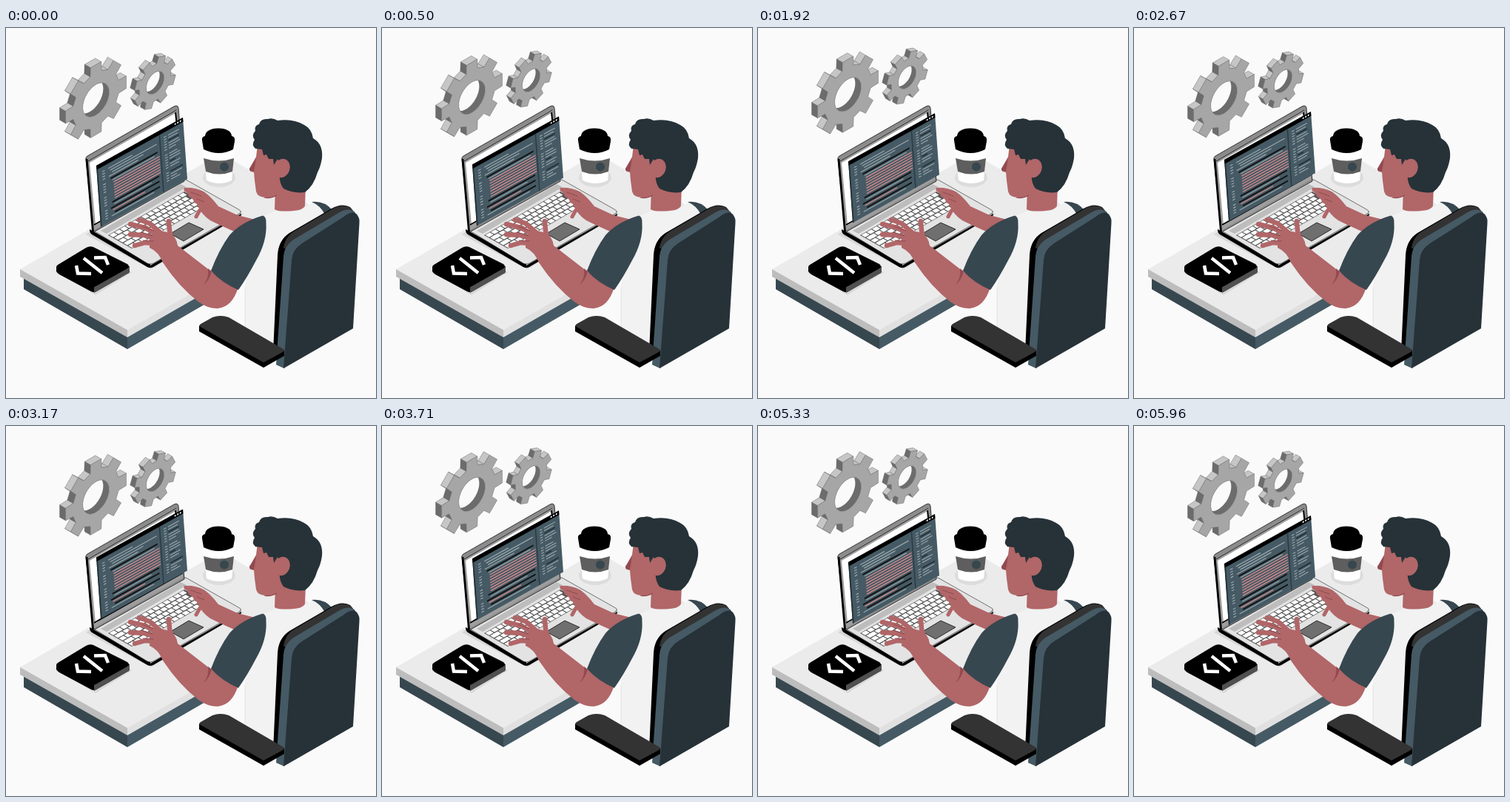
An HTML page for the animation above (6000 ms loop, 500 by 500 pixels).

```html
<!DOCTYPE html>
<html lang="en">
<head>
<meta charset="utf-8">
<title>Developer at a desk</title>
<style>
html, body { margin: 0; width: 100%; height: 100%; overflow: hidden; background: #fafafa; }
svg { display: block; width: 100vw; height: 100vh; }
.skin { fill: #b16668; }
.fingers { fill: none; stroke: #b16668; stroke-linecap: round; stroke-linejoin: round; }
.crease { fill: none; stroke: #924a50; stroke-width: 1; stroke-linecap: round; }
</style>
</head>
<body>
<svg viewBox="0 0 500 500">
  <g id="gears"></g>

  <!-- desk -->
  <path fill="#37474f" d="M24 338L164 417V434L24 353Z"/>
  <path fill="#455a64" d="M164 417L290 344V361L164 434Z"/>
  <path fill="#ebebeb" d="M19 326L290 169.500L440 256L164 408Z"/>
  <path fill="#bdbdbd" d="M19 326L164 408V418L19 336Z"/>
  <path fill="#e0e0e0" d="M164 408L300 331V340L164 418Z"/>

  <!-- notebook -->
  <path fill="#d8d8d8" d="M66 328L110 302L170 330L121 361Z"/>
  <path d="M68 323V329Q69 331 72 333L115 356Q119 358 122 356L164 332Q167 331 167 328V322Z"/>
  <path fill="#505050" d="M119 350L167 322V328Q167 331 164 332L119 358Z"/>
  <path d="M70 320L108 297Q113 294 118 296L164 319Q168 322 164 325L123 348Q119 351 114 348L70 326Q66 323 70 320Z"/>
  <g fill="none" stroke="#fff" stroke-width="4.5">
    <path d="M95 321L97 331.500L115 332"/><path d="M119 310.500L134 310L138 320"/>
    <path d="M105 311L130 331"/>
  </g>

  <!-- cup -->
  <ellipse cx="288" cy="202" rx="22" ry="13" fill="#dcdcdc"/>
  <path fill="#fff" d="M266 163L271 206Q288 214 305 206L309 163Z"/>
  <path fill="#5e5e5e" d="M267 176Q288 183 308 176L306 194Q288 201 270 194Z"/>
  <circle cx="295" cy="187.500" r="6" fill="#37474f"/>
  <path d="M265 152Q264 147 269 146Q270 136 287 135.500Q304 136 305 146Q310 147 309 153L307 164Q288 174 267 164Z"/>

  <!-- laptop -->
  <path fill="#d6d6d6" d="M108 279L122 268L322 251L196 326Z"/>
  <path d="M113 272L195 318L318 249V252Q318 254 315 255L199 323Q195 325 191 323L116 279Q113 277 113 272Z"/>
  <path fill="#bdbdbd" d="M195 317L318 247V251L195 321Z"/>
  <path fill="#e3e3e3" stroke="#222" stroke-width=".6" d="M117 273L239 205Q242 204 245 206L314 245Q320 248 315 251L199 318Q195 320 191 318Z"/>
  <path fill="#bdbdbd" d="M128 274L236 211L244 215L136 278Z"/>
  <g id="keys"></g>
  <path fill="#6f6f6f" stroke="#111" stroke-width=".8" d="M222 278L247 263L267 272L240 288Z"/>
  <path fill="#8b8b8b" stroke="#111" stroke-width=".8" d="M108 178Q107 175 110 173L227 106Q232 103.500 233 108L241 207L118 276Z"/>
  <path fill="#9e9e9e" d="M111 179L229 110L239 205L119 273Z"/>
  <path fill="#fff" d="M113 182L229 115L238 199L121 266Z"/>
  <path fill="none" stroke="#000" stroke-width="2" d="M229 114L238 199L119 266"/>
  <path fill="none" stroke="#000" stroke-width="2.800" d="M109 177L117.500 275"/>
  <path fill="none" stroke="#222" stroke-width="1" d="M111 180L230 111"/>

  <g id="win"></g>

  <!-- far arm -->
  <path class="skin" d="M240 216Q256 215 268 221.500Q278 229 287 241L313 253L345 261L330 284L306 274Q288 266 276 260Q264 252 258 238L243 221Z"/>
  <path class="fingers" stroke-width="5" d="M268 226L243 218.500M268 231L249 226M270 238L256 234M274 246L262 246L257 255"/>
  <path class="crease" d="M250 222L264 227M258 231L268 235"/>

  <!-- shirt and neck -->
  <path fill="#f2f2f2" d="M340 258L364 247L405 242L415 235Q427 239 434 249L400 290L372 440L323 410V345Z"/>
  <path fill="#37474f" d="M413 235Q430 233 441 246L431 252Q425 240 413 235Z"/>
  <path fill="none" stroke="#d8d8d8" stroke-width=".7" d="M323 350V410"/>
  <path fill="#b16668" d="M364 214H405L404 240Q402 247 382 247.500Q366 248 363 245Z"/>

  <!-- near arm -->
  <path class="skin" d="M194 283L204 273L218 276Q230 280 232 294L276 328L314 350Q306 377 286 379Q272 379 260 370Q234 350 212 317Q206 302 194 297Z"/>
  <path class="fingers" stroke-width="6.500" d="M208 276L194 264L180 259M205 280L188 270L168 265M203 285L187 280L168 279M202 291L188 290L174 294M224 286L221 274L220 261"/>
  <path class="crease" d="M184 268L199 274M183 276L198 281M185 287L199 288"/>
  <path fill="#924a50" d="M273 325Q275 337 267 347Q274 342 278 329Z"/>
  <path fill="#37474f" d="M347 253.500Q352 255 351.500 264Q353 288 338 314Q326 337 314 354Q291 344 277 328Q288 299 302 280Q318 262 347 253.500Z"/>

  <!-- head -->
  <path class="skin" d="M340 158L338 174L329 190Q328 194 335 195L336 206L338 221Q340 229 352 229Q363 231 370 222L395 212L392 155Z"/>
  <path fill="#924a50" d="M338 176L329 190Q328 194 335 194Z"/>
  <path fill="none" stroke="#924a50" stroke-width="1.200" d="M349 229Q357 231 366 226"/>
  <path fill="#263238" d="M337 163Q331 158 336 151Q331 145 337 139Q335 132 342 130Q344 122 354 123Q360 121 367 125Q388 122 403 131Q413 136 415 149Q429 157 427 176Q425 188 421 195Q416 213 404 222Q388 224 375 217Q367 207 371 187L367 177L362 185L361 177L355 177L352 171L348 172L346 164Z"/>
  <ellipse class="skin" cx="373" cy="189.500" rx="10.500" ry="13" transform="rotate(18 373 189.500)"/>

  <!-- chair -->
  <path d="M361 438L367 307Q368 287 383 277L440 244Q454 236 465 242L470 250L390 310L374 458Z"/>
  <path fill="#333" d="M375 297Q377 282 389 275L442 244Q455 237 466 243L470 248Q460 245 450 251L394 283Q383 290 380 300Z"/>
  <path fill="#455a64" d="M365 455L375 309Q376 294 390 285L451 249Q463 242 472 249L397 310L376 460Z"/>
  <path fill="#263238" d="M375 460L386 314Q387 299 400 291L455 256Q471 243 476 255Q478 258 477.500 264L469 406Z"/>
  <path d="M261 402L348 450L376 435V443L348 459L261 410Z"/>
  <path fill="#333" d="M263 400L279 391Q290 387 301 391L375 434Q377 436 374 438L348 452L263 404Q260 402 263 400Z"/>
</svg>
<script>
const NS = 'http://www.w3.org/2000/svg';
const $ = id => document.getElementById(id);

function add(parent, tag, attrs) {
  const el = document.createElementNS(NS, tag);
  for (const k in attrs) el.setAttribute(k, attrs[k]);
  parent.append(el);
  return el;
}

const rect = (g, x, y, width, height, fill) => add(g, 'rect', { x, y, width, height, fill });
const poly = pts => 'M' + pts.map(p => p.map(n => n.toFixed(2)).join(' ')).join('L') + 'Z';

// Extruded eight-tooth gear on an isometric wall
function gear(cx, cy, r, turn, depth) {
  const g = $('gears');
  const [dx, dy] = [-depth, -depth * 0.577];
  const at = (deg, rad) => {
    const a = deg * Math.PI / 180;
    const x = rad * Math.cos(a);
    return [cx + x * 0.866, cy + rad * Math.sin(a) - x * 0.5];
  };
  const circle = (rad, ox = 0, oy = 0) =>
    poly(Array.from({ length: 48 }, (_, i) => at(i * 7.5, rad)).map(([x, y]) => [x + ox, y + oy]));

  const rim = [];
  for (let i = 0; i < 8; i++) {
    const mid = i * 45 + turn;
    rim.push(at(mid - 14, r * 0.76), at(mid - 10, r), at(mid + 10, r), at(mid + 14, r * 0.76));
  }
  const sides = rim.map((p, i) => {
    const q = rim[(i + 1) % rim.length];
    const len = Math.hypot(q[0] - p[0], q[1] - p[1]);
    const nx = (q[1] - p[1]) / len, ny = (p[0] - q[0]) / len;
    return { p, q, ny, facing: nx * dx + ny * dy, order: (p[0] + q[0]) * dx + (p[1] + q[1]) * dy };
  }).filter(s => s.facing > 0).sort((a, b) => a.order - b.order);

  for (const { p, q, ny } of sides) {
    const back = [q, p].map(([x, y]) => [x + dx, y + dy]);
    add(g, 'path', { d: poly([p, q, ...back]), fill: ny < -0.4 ? '#c6c6c6' : '#6c6c6c', stroke: '#555', 'stroke-width': 0.4 });
  }
  const hole = circle(r * 0.43);
  const id = 'hole' + r;
  add(add(g, 'clipPath', { id }), 'path', { d: hole });
  add(g, 'path', { d: hole, fill: '#6c6c6c' });
  add(g, 'path', { d: circle(r * 0.43, dx, dy), fill: '#fafafa', 'clip-path': `url(#${id})` });
  add(g, 'path', { d: poly(rim) + hole, fill: '#a6a6a6', 'fill-rule': 'evenodd', stroke: '#666', 'stroke-width': 0.5 });
}

function keyboard() {
  const g = add($('keys'), 'g', { transform: 'matrix(1.03 -.59 .32 .18 138 280)' });
  rect(g, 0, 0, 100, 100, '#555');
  for (let row = 0; row < 5; row++) {
    const shift = row % 2 * 3;
    for (let x = 1; x < 98; x += 7) {
      const left = Math.max(1, x - shift);
      rect(g, left, row * 20 + 2, Math.min(5.9, 99 - left), 16, '#fff');
    }
  }
}

function codeWindow() {
  const g = add($('win'), 'g', { transform: 'matrix(1.17 -.65 .06 .83 122 186)' });
  let seed = 7;
  const rnd = () => (seed = seed * 16807 % 2147483647) / 2147483647;
  rect(g, 0, 0, 100, 100, '#455a64');
  rect(g, 0, 0, 100, 7, '#000');
  rect(g, 0, 7, 1.5, 93, '#263238');
  rect(g, 72, 7, 1.2, 93, '#2b3a42');
  for (const x of [91, 94, 97]) add(g, 'ellipse', { cx: x, cy: 3.5, rx: 0.9, ry: 1.3, fill: '#fff' });

  for (let i = 0; i < 19; i++) {
    const y = 14 + i * 4.3;
    if (i % 5 < 4) rect(g, 6, y, 3, 1.6, '#9aa7ad');
    const red = i > 5 && i < 13;
    const black = i === 4 || i === 13 || i === 15 || i === 17;
    const x = red ? 18 : 13 + (i % 3) * 2;
    const w = red ? 53 : black ? 56 - (i % 3) * 2 : 28 + rnd() * 28;
    rect(g, x, y, w, black ? 2.4 : 1.6, red || i === 16 ? '#e08c8e' : black ? '#111' : '#9aa7ad');
  }
  for (let i = 0; i < 18; i++) {
    if (i % 7 === 6) continue;
    const y = 14 + i * 4.2;
    rect(g, 77, y, 3, 1.5, '#9aa7ad');
    rect(g, 82, y, 6 + rnd() * 9, 1.5, i % 4 === 2 ? '#17232a' : '#9aa7ad');
  }
}

gear(121.5, 97, 48, 0, 8);
gear(201.5, 74, 32.5, 20, 6);
keyboard();
codeWindow();

const STEP = 1000 / 24;
// Rises from 0 to 1 and falls back at constant speed
const triangle = (t, period) => 1 - Math.abs(1 - 2 * (t % period) / period);
const lift = (id, d) => $(id).setAttribute('transform', `translate(0 ${-d})`);

function draw(now) {
  const t = Math.floor((now % 6000 + 2) / STEP) * STEP;
  lift('gears', 10 * triangle(t, 3000));
  lift('win', 9 * triangle(t, 6000));
}

const start = performance.now();
function tick() {
  draw(performance.now() - start);
  requestAnimationFrame(tick);
}
tick();
</script>
</body>
</html>
```
